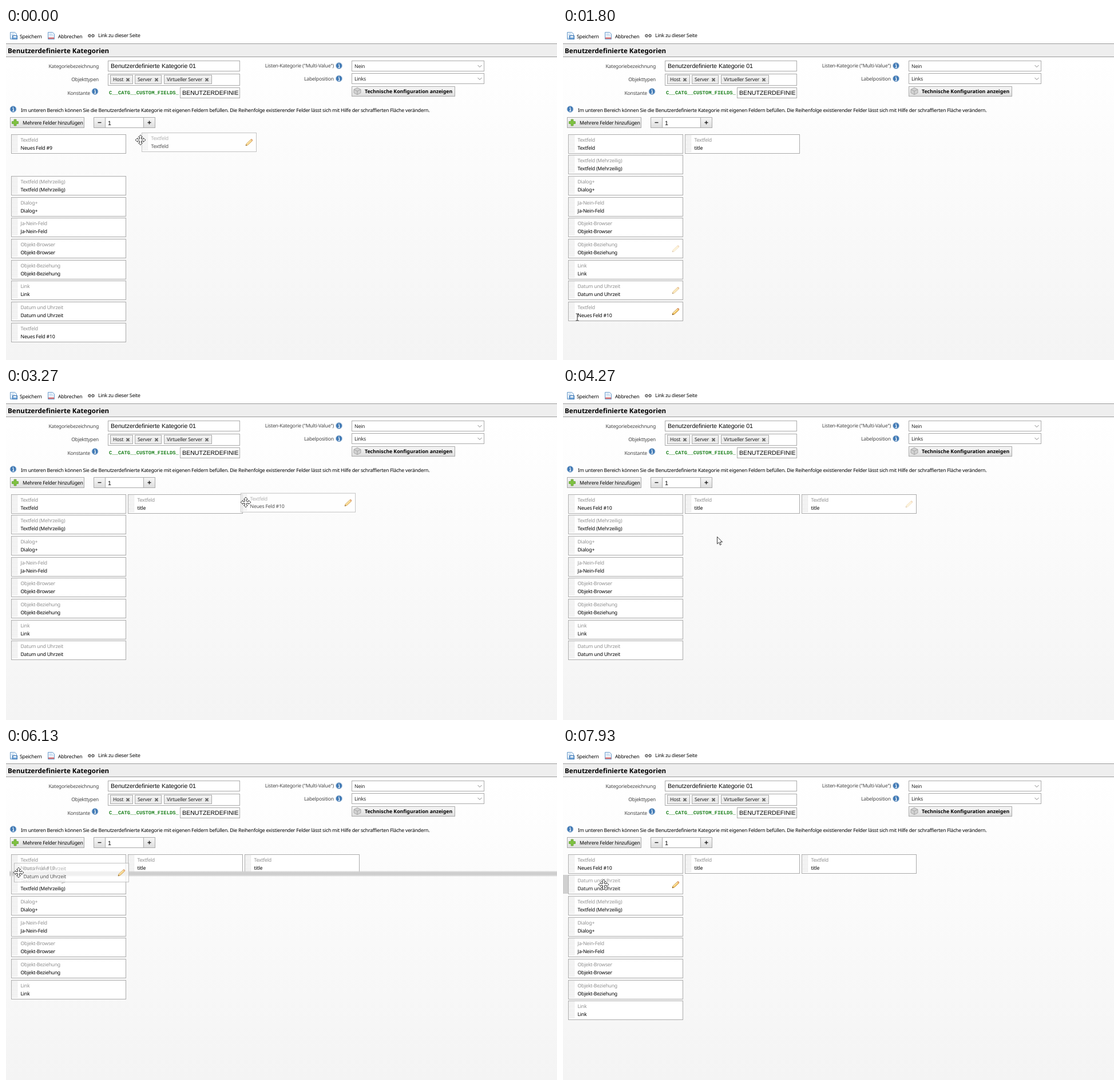
These frames come from a looping animation (963x581 px, 8 s). An HTML page with a canvas:

```html
<!DOCTYPE html>
<html lang="de">
<head>
<meta charset="utf-8">
<title>Benutzerdefinierte Kategorien</title>
<style>
html, body { margin: 0; width: 100%; height: 100%; overflow: hidden; background: #fff; }
canvas { display: block; }
</style>
</head>
<body>
<canvas id="stage" width="963" height="581"></canvas>
<script>
const ctx = document.getElementById('stage').getContext('2d');
const LOOP = 8000;
const STEP = 1000 / 15;
const UI = '8.7px "Noto Sans", sans-serif';
const BOLD = 'bold 8.75px "Noto Sans", sans-serif';
const TITLE = 'bold 11.6px "Noto Sans", sans-serif';
const FIELD = '10.6px "Liberation Sans", Arial, sans-serif';
const MONO = 'bold 8.84px "Liberation Mono", monospace';

// ---------- helpers ----------
const clamp = v => Math.max(0, Math.min(1, v));

function text(s, x, y, { font = UI, color = '#000', align = 'left' } = {}) {
  ctx.font = font;
  ctx.letterSpacing = font === UI ? '-0.22px' : '0px';
  ctx.textRendering = 'geometricPrecision';
  ctx.textAlign = align;
  ctx.fillStyle = color;
  ctx.fillText(s, x, y);
}

function box(x, y, w, h, fill = '#fff', stroke = '#aaa') {
  ctx.fillStyle = fill;
  ctx.fillRect(x, y, w + 1, h + 1);
  ctx.strokeStyle = stroke;
  ctx.lineWidth = 1;
  ctx.strokeRect(x + .5, y + .5, w, h);
}

function gradient(y0, y1, ...colors) {
  const g = ctx.createLinearGradient(0, y0, 0, y1);
  colors.forEach((c, i) => g.addColorStop(i / (colors.length - 1), c));
  return g;
}

const button = (x, y, w, h) => box(x, y, w, h, gradient(y, y + h, '#f8f8f8', '#dedede'));

function shape(d, x, y, fill, stroke, width = 1) {
  const path = new Path2D(d);
  ctx.save();
  ctx.translate(x, y);
  if (fill) { ctx.fillStyle = fill; ctx.fill(path); }
  if (stroke) { ctx.strokeStyle = stroke; ctx.lineWidth = width; ctx.stroke(path); }
  ctx.restore();
}

function withAlpha(alpha, draw) {
  ctx.save();
  ctx.globalAlpha = alpha;
  draw();
  ctx.restore();
}

// ---------- icons ----------
function info(x, y) {
  shape('M5.5 0A5.5 5.5 0 1 1 -5.5 0A5.5 5.5 0 1 1 5.5 0Z', x, y, '#3f79b5', '#bccde0');
  shape('M-1.3 -1H.6V3M-1.5 3.1H1.7M-.1 -3.7V-2.3', x, y, null, '#fff', 1.2);
}

function pencil(x, y) {
  shape('M-6 6L-5 2.5L3 -5Q4.5 -6 5.5 -4.5Q6.3 -3.2 5 -2L-2.5 5Z', x, y, '#f3c35b', '#b9812f', .8);
  shape('M-4 3L3.5 -3.8', x, y, null, '#fff0b8', 1.2);
  shape('M2.8 -4.8L5 -2L6 -3.6L4.4 -5.8Z', x, y, '#e49a7a');
  shape('M-6 6L-5.4 3.8L-3.9 5.4Z', x, y, '#564226');
}

function page(x, y, footer) {
  shape('M0 0H8L11 3V12H0Z', x, y, '#eaf3fc', '#6c9cca');
  shape('M2 3H7M2 5H9', x, y, null, '#b9d2ea');
  ctx.fillStyle = footer;
  ctx.fillRect(x + .5, y + 9, 10, 2.5);
}

function toolbarIcons() {
  page(7.5, 7.5, '#bcd6ef');
  box(11, 13, 8, 6, '#76a9db', '#3c75b0');
  ctx.fillStyle = '#fff';
  ctx.fillRect(13, 14, 5, 2.5);
  page(73.5, 7.5, '#e27272');
  shape('M-1 -2H-3A2 2 0 0 0 -3 2H-1M1 -2H3A2 2 0 0 1 3 2H1M-2.5 0H2.5', 149, 13.5, null, '#555', 1.4);
}

const cursors = {
  move: (x, y) => shape('M0 -9L3.5 -5H1.5V-1.5H5V-3.5L9 0L5 3.5V1.5H1.5V5H3.5L0 9L-3.5 5H-1.5V1.5H-5V3.5L-9 0L-5 -3.5V-1.5H-1.5V-5H-3.5Z', x, y, '#fff', '#333', .9),
  arrow: (x, y) => shape('M0 0V12.5L3 9.8L5 14.5L7 13.6L5 9.2H9Z', x, y, '#fff', '#222', .9),
  beam: (x, y) => shape('M-2.5 -6H-.7L0 -5.3L.7 -6H2.5M0 -5.3V5.3M-2.5 6H-.7L0 5.3L.7 6H2.5', x, y, null, '#222')
};

// ---------- static form ----------
function select(y, value) {
  box(604, y, 231, 18);
  text(value, 609, y + 12.5, { color: '#222' });
  shape('M-3.5 -2L0 1.5L3.5 -2', 828, y + 10, null, '#777', .9);
}

function tag(x, w, label) {
  box(x, 82, w, 15, gradient(82, 97, '#f4f4f4', '#f0f0f0', '#e8e8e8', '#eee'));
  text(label, x + 5, 93.3, { color: '#222' });
  shape('M-2.5 -2.5L2.5 2.5M2.5 -2.5L-2.5 2.5', x + w - 8, 90.5, null, '#666', 1.8);
}

function form() {
  ctx.fillStyle = '#fff';
  ctx.fillRect(0, 0, 963, 581);
  ctx.fillStyle = gradient(51, 581, '#fff', '#f4f4f4');
  ctx.fillRect(0, 51, 963, 530);

  toolbarIcons();
  text('Speichern', 24, 17.5);
  text('Abbrechen', 91, 17.5);
  text('Link zu dieser Seite', 161, 16.3);

  box(-1, 27, 965, 23, '#eee', '#999');
  text('Benutzerdefinierte Kategorien', 3, 43.6, { font: TITLE });

  const label = { color: '#444', align: 'right' };
  text('Kategoriebezeichnung', 162, 69.5, label);
  text('Objekttypen', 162, 93.3, label);
  text('Konstante', 147, 117, label);
  text('Listen-Kategorie ("Multi-Value")', 573, 69.3, label);
  text('Labelposition', 573, 91.5, label);
  info(155.5, 111);
  info(582, 66);
  info(582, 88.5);
  info(12.5, 142);

  box(178, 57, 230, 18);
  text('Benutzerdefinierte Kategorie 01', 183, 70, { font: FIELD });
  box(178, 80, 230, 20);
  tag(182, 39, 'Host');
  tag(225, 46, 'Server');
  tag(276, 83, 'Virtueller Server');
  text('C__CATG__CUSTOM_FIELDS_', 180, 116, { font: MONO, color: '#1c801c' });
  box(304, 104, 104, 18);
  ctx.save();
  ctx.beginPath();
  ctx.rect(305, 104, 101, 18);
  ctx.clip();
  text('BENUTZERDEFINIERTE', 308, 117.2, { font: FIELD });
  ctx.restore();

  select(57, 'Nein');
  select(79, 'Links');
  button(604, 102, 180, 17);
  shape('M0 -6L6 -3V3L0 6L-6 3V-3Z', 614, 110.5, '#d2d2d2', '#999', .8);
  shape('M-6 -3L0 0L6 -3M0 0V6', 614, 110.5, null, '#999', .8);
  text('Technische Konfiguration anzeigen', 627, 114, { font: BOLD });

  text('Im unteren Bereich können Sie die Benutzerdefinierte Kategorie mit eigenen Feldern befüllen. ' +
    'Die Reihenfolge existierender Felder lässt sich mit Hilfe der schraffierten Fläche verändern.', 26, 146.5);

  button(7, 156, 129, 18);
  shape('M-2 -5.5H2V-2H5.5V2H2V5.5H-2V2H-5.5V-2H-2Z', 16, 165.5, '#7fc241', '#5a9a2c', .7);
  text('Mehrere Felder hinzufügen', 29, 169);
  button(153, 156, 20, 18);
  box(173, 156, 67, 18);
  button(240, 156, 20, 18);
  text('1', 178, 169.5, { font: FIELD });
  shape('M-3 0H3', 163.5, 165.5, null, '#222', 1.4);
  shape('M-3 0H3M0 -3V3', 250.5, 165.5, null, '#222', 1.4);
}

// ---------- fields ----------
const PITCH = 36.67;
const rowY = i => Math.round(185.75 + PITCH * i);
const colX = i => 9 + 204 * i;
const field = (type, label = type) => ({ type, label });
const standard = ['Textfeld (Mehrzeilig)', 'Dialog+', 'Ja-Nein-Feld', 'Objekt-Browser', 'Objekt-Beziehung', 'Link'].map(s => field(s));
const plain = field('Textfeld');
const nine = field('Textfeld', 'Neues Feld #9');
const ten = field('Textfeld', 'Neues Feld #10');
const titled = field('Textfeld', 'title');
const date = field('Datum und Uhrzeit');

// home: row the field is taken from
const drags = [
  { from: -1000, to: 930, item: plain },
  { from: 2470, to: 4000, item: ten, home: 8 },
  { from: 5390, to: 6600, item: date, home: 7 },
  { from: 7830, to: LOOP, item: date, home: 1 }
];
const dragAt = t => drags.find(d => t >= d.from && t < d.to);

function cellsAt(t) {
  const rows =
    t < 930 ? [nine, plain, ...standard, date, ten] :
    t < 4000 ? [plain, ...standard, date, ten] :
    t < 6600 ? [ten, ...standard, date] : [ten, date, ...standard];
  const extras = t < 930 ? 0 : t < 4000 ? 1 : 2;
  const dragged = dragAt(t)?.item;
  const cells = rows.map((f, i) => ({ ...f, x: colX(0), y: rowY(i), hidden: f === dragged }));
  for (let i = 1; i <= extras; i++) cells.push({ ...titled, x: colX(i), y: rowY(0) });
  return cells.filter(c => !c.hidden);
}

function drawCell(x, y, { type, label }) {
  box(x, y, 200, 33);
  ctx.save();
  ctx.strokeStyle = '#c4c4c4';
  ctx.setLineDash([1, 1.3]);
  ctx.beginPath();
  for (let dx = 2.5; dx < 11; dx += 2) {
    ctx.moveTo(x + dx, y + 2);
    ctx.lineTo(x + dx, y + 32);
  }
  ctx.stroke();
  ctx.restore();
  text(type, x + 16.5, y + 13, { color: '#8e8e8e' });
  text(label, x + 16.5, y + 26.5);
}

const drawPencil = (x, y) => pencil(x + 188, y + 17);

// ---------- pointer ----------
// Each move: start, end, x, y; the pointer rests in between
const START = { x: 245, y: 200 };
const moves = [
  [-66, 0, 235, 196], [70, 470, 206, 202], [930, 1200, 219, 204], [1400, 1800, 25, 506],
  [1930, 2130, 17, 496], [2470, 3270, 419, 200], [4000, 4530, 238, 273], [4730, 5330, 17, 459],
  [5390, 5580, 15, 228], [5600, 6130, 22, 218], [7200, 7530, 17, 239], [7870, 7930, 71, 239]
];
const easeOut = p => 1 - Math.pow(1 - p, 2.5);

function pointerAt(t) {
  let { x, y } = START;
  for (const [from, to, toX, toY] of moves) {
    const p = easeOut(clamp((t - from) / (to - from)));
    x += (toX - x) * p;
    y += (toY - y) * p;
  }
  return { x, y };
}

function hoveredAt(t) {
  if (dragAt(t)) return null;
  const { x, y } = pointerAt(t);
  return cellsAt(t).find(c => x >= c.x && x <= c.x + 201 && y >= c.y && y <= c.y + 34);
}

// A pencil appears at once and fades over five steps
function pencilAlpha(cell, t) {
  for (let age = 0; age < 5; age++) {
    const hit = hoveredAt(t - age * STEP);
    if (hit && hit.x === cell.x && hit.y === cell.y) return 1 - age / 5;
  }
  return 0;
}

function cursorAt(t) {
  if (dragAt(t)) return 'move';
  const cell = hoveredAt(t);
  if (!cell) return 'arrow';
  return pointerAt(t).x < cell.x + 11 ? 'move' : 'beam';
}

// ---------- dragging ----------
function dropBar(cardY) {
  const gap = Math.round((cardY + 16.5 - 220) / PITCH);
  const y = 219.5 + PITCH * gap;
  ctx.fillStyle = gradient(y - 5, y + 6, 'rgba(205,205,205,0)', '#d0d0d0', '#cdcdcd', '#d2d2d2', 'rgba(215,215,215,0)');
  ctx.fillRect(6, y - 5, 957, 11);
}

// The card trails the pointer by one step
function drawDrag({ from, item, home }, t) {
  const grip = pointerAt(t - STEP);
  const x = grip.x - 8, y = grip.y - 17;
  if (home && t < from + 2 * STEP) {
    ctx.fillStyle = '#d0d0d0';
    ctx.fillRect(0, rowY(home), 10, 33);
  } else if (y > 194) {
    dropBar(y);
  }
  withAlpha(1 - .3 * clamp((t - from) / 400), () => {
    drawCell(x, y, item);
    drawPencil(x, y);
  });
}

function render(t) {
  form();
  for (const cell of cellsAt(t)) {
    drawCell(cell.x, cell.y, cell);
    withAlpha(pencilAlpha(cell, t), () => drawPencil(cell.x, cell.y));
  }
  const drag = dragAt(t);
  if (drag) drawDrag(drag, t);
  const { x, y } = pointerAt(t);
  cursors[cursorAt(t)](x, y);
}

const begin = performance.now();
function tick() {
  const t = (performance.now() - begin) % LOOP;
  render(Math.floor((t + 5) / STEP) * STEP);
  requestAnimationFrame(tick);
}
tick();
</script>
</body>
</html>
```
